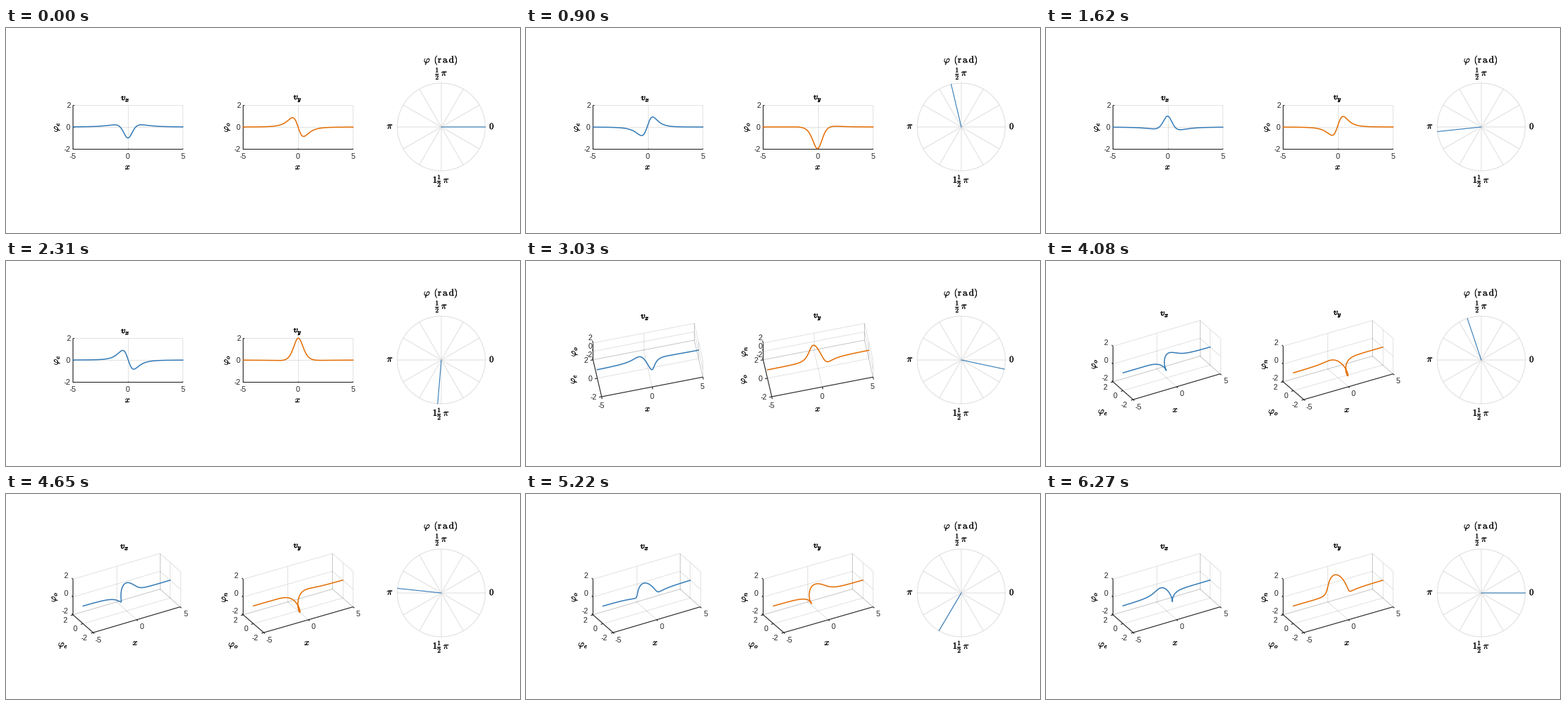
Write a matplotlib script that moves like this. It is 725 px wide and 290 px high and loops after 6300 ms.

```python
import numpy as np
import matplotlib.pyplot as plt
from matplotlib.animation import FuncAnimation
from matplotlib.collections import LineCollection
from matplotlib.patheffects import Normal, Stroke

W, H, DPI = 725, 290, 100
FRAMES, STEP = 210, 30
TURN_START, TURN_LEN = 89, 30
PX = 72 / DPI                      # one pixel in points
BLUE, ORANGE, DARK, GRID = "#337ab7", "#e36c00", "#262626", "#dedede"
MID_Y, FIT_W = 140.1, 155

plt.rcParams["font.family"] = ["Liberation Sans", "DejaVu Sans"]
plt.rcParams["mathtext.fontset"] = "cm"

fig = plt.figure(figsize=(W / DPI, H / DPI), dpi=DPI, facecolor="white")
ax = fig.add_axes([0, 0, 1, 1])
ax.set(xlim=(0, W), ylim=(H, 0))
ax.axis("off")

x = np.linspace(-5, 5, 601)
falloff = (1 + x**2) ** 2.5
even = (1 - 2 * x**2) / falloff
odd = -3 * x / falloff
norm = (2 - x**2) / falloff


def label(s, size, pos=(0, 0), **kw):
    kw = {"ha": "center", "va": "center", "color": "black", **kw}
    return ax.text(*pos, s, fontsize=size * PX, **kw)


def formula(s, size, pos=(0, 0), weight=0.2, **kw):
    """Math label, slightly thickened."""
    text = label(f"${s}$", size, pos, **kw)
    text.set_path_effects([Stroke(linewidth=weight * PX, foreground="black"),
                           Normal()])
    return text


def blend(f, start, middle, end):
    """Offset for the flat, tilting and final view."""
    return np.array([np.interp(f, (0, 0.4, 1), v)
                     for v in zip(start, middle, end)])


class Panel:
    def __init__(self, left, pair, color, names, title_x, squeeze):
        self.left, self.pair, self.squeeze = left, pair, squeeze
        self.title_x = title_x
        self.grid = LineCollection([], colors=DARK, alpha=0.15,
                                   linewidths=0.9 * PX)
        self.axes = LineCollection([], colors=DARK, linewidths=1.1 * PX,
                                   zorder=2)
        ax.add_collection(self.grid, autolim=False)
        ax.add_collection(self.axes, autolim=False)
        self.curve, = ax.plot([], [], color=color, lw=1.5 * PX, zorder=3)
        title, ylab, zlab = names
        self.title = formula(title, 12.2, weight=0.5)
        self.xlab = formula("x", 12.2)
        self.ylab = formula(ylab, 12.8)
        self.zlab = formula(zlab, 12.8, rotation=90)
        self.xticks = [label(str(v), 10.67, color=DARK) for v in (-5, 0, 5)]
        self.yticks, self.zticks = (
            [label(str(v), 10.67, color=DARK, ha="right") for v in (-2, 0, 2)]
            for _ in "yz")

    def set_view(self, f):
        az, el = np.radians(30 * f), np.radians(90 - 60 * f)
        scale = FIT_W / (10 * np.cos(az) + 4 * np.sin(az))
        kx = 1 - self.squeeze * np.clip((f - 0.4) / 0.6, 0, 1)

        def project(px, py, pz):
            u = px * np.cos(az) - py * np.sin(az)
            v = (px * np.sin(az) + py * np.cos(az)) * np.sin(el)
            v = v + pz * np.cos(el)
            return np.array([self.left + (FIT_W / 2 + u * scale) * kx,
                             MID_Y - v * scale])
        return project

    def update(self, f, phi):
        project = self.set_view(f)
        c, s = np.cos(phi), np.sin(phi)
        a, b = self.pair
        self.curve.set_data(*project(x, a * c - b * s, a * s + b * c))

        def seg(p, q):
            return [project(*p), project(*q)]

        tilted = f > 0
        xs, ys = (-5, 0, 5), (-2, 0, 2)
        grid = [seg((v, -2, -2), (v, 2, -2)) for v in xs]
        grid += [seg((-5, v, -2), (5, v, -2)) for v in ys]
        axes = [seg((-5, -2, -2), (5, -2, -2)), seg((-5, -2, -2), (-5, 2, -2))]
        t = -0.25 if tilted else 0.1
        axes += [seg((v, -2, -2), (v, -2 + t, -2)) for v in xs]
        axes += [seg((-5, v, -2), (-5 + t, v, -2)) for v in ys]
        if tilted:
            grid += [seg((v, 2, -2), (v, 2, 2)) for v in xs]
            grid += [seg((5, v, -2), (5, v, 2)) for v in ys]
            grid += [seg((-5, 2, v), (5, 2, v)) for v in ys]
            grid += [seg((5, -2, v), (5, 2, v)) for v in ys]
            axes.append(seg((-5, 2, -2), (-5, 2, 2)))
            axes += [seg((-5, 2, v), (-5, 2 - t, v)) for v in ys]
        self.grid.set_segments(grid)
        self.axes.set_segments(axes)

        def place(text, point, *offsets):
            text.set_position(project(*point) + blend(f, *offsets))

        for text, v in zip(self.xticks, xs):
            place(text, (v, -2, -2), (0, 10.5), (-0.5, 13.5), (7.5, 10.5))
        for text, v in zip(self.yticks, ys):
            place(text, (-5, v, -2), (-3.5, 0.5), (-7, 1.5), (-8, 8))
        for text, v in zip(self.zticks, ys):
            place(text, (-5, 2, v), (-1, -7), (-1, -7), (-7, -4.5))
            text.set_visible(tilted)
        place(self.xlab, (0, -2, -2), (0, 26), (-6, 31.5), (-1.5, 33))
        place(self.zlab, (-5, 2, 0), (-26, 0), (-26, 0), (-26, 0))
        self.zlab.set_visible(tilted)
        if f < 0.7:
            place(self.ylab, (-5, 0, -2), (-22.5, 0), (-33, 1), (-33, 1))
        else:
            place(self.ylab, (-5, 0, -2), (-28, 31), (-28, 31), (-28, 31))
        self.ylab.set_rotation(90 if f < 0.7 else 0)
        top = project(5, 2, 2)[1]
        self.title.set_position((self.title_x - 40 * self.squeeze * f,
                                 top - 9))


panels = [
    Panel(94.5, (-even, odd), BLUE,
          ("v_x", r"\varphi_e", r"\varphi_o"), 168.5, 0.025),
    Panel(334.5, (odd, norm), ORANGE,
          ("v_y", r"\varphi_o", r"\varphi_n"), 411.5, 0),
]

# Phase dial
CX, CY, R = 614, 140, 62
turn = np.linspace(0, 2 * np.pi, 181)
ax.plot(CX + R * np.cos(turn), CY + R * np.sin(turn), color=GRID, lw=PX)
for ang in np.radians(np.arange(0, 360, 30)):
    ax.plot([CX, CX + R * np.cos(ang)], [CY, CY - R * np.sin(ang)],
            color=GRID, lw=PX, snap=False)
hand, = ax.plot([], [], color=BLUE, lw=1.1 * PX, zorder=3, snap=False)
formula(r"\varphi\ \,(\mathrm{r\,a\,d})", 13.33, (613.5, 45.5))
formula(r"\frac{1}{2}\,\pi", 13.33, (614.5, 64))
formula(r"\pi", 13.33, (542, 139.5))
formula("0", 12.5, (685.5, 139.5))
formula(r"1\frac{1}{2}\,\pi", 13.33, (614, 215.5))


def update(i):
    phi = 4 * np.pi * i / (FRAMES - 1)
    f = np.clip((i - TURN_START) / TURN_LEN, 0, 1)
    for panel in panels:
        panel.update(f, phi)
    hand.set_data([CX, CX + R * np.cos(phi)], [CY, CY - R * np.sin(phi)])
    return []


anim = FuncAnimation(fig, update, frames=FRAMES, interval=STEP,
                     repeat=True, repeat_delay=0, blit=False)
plt.show()
```
